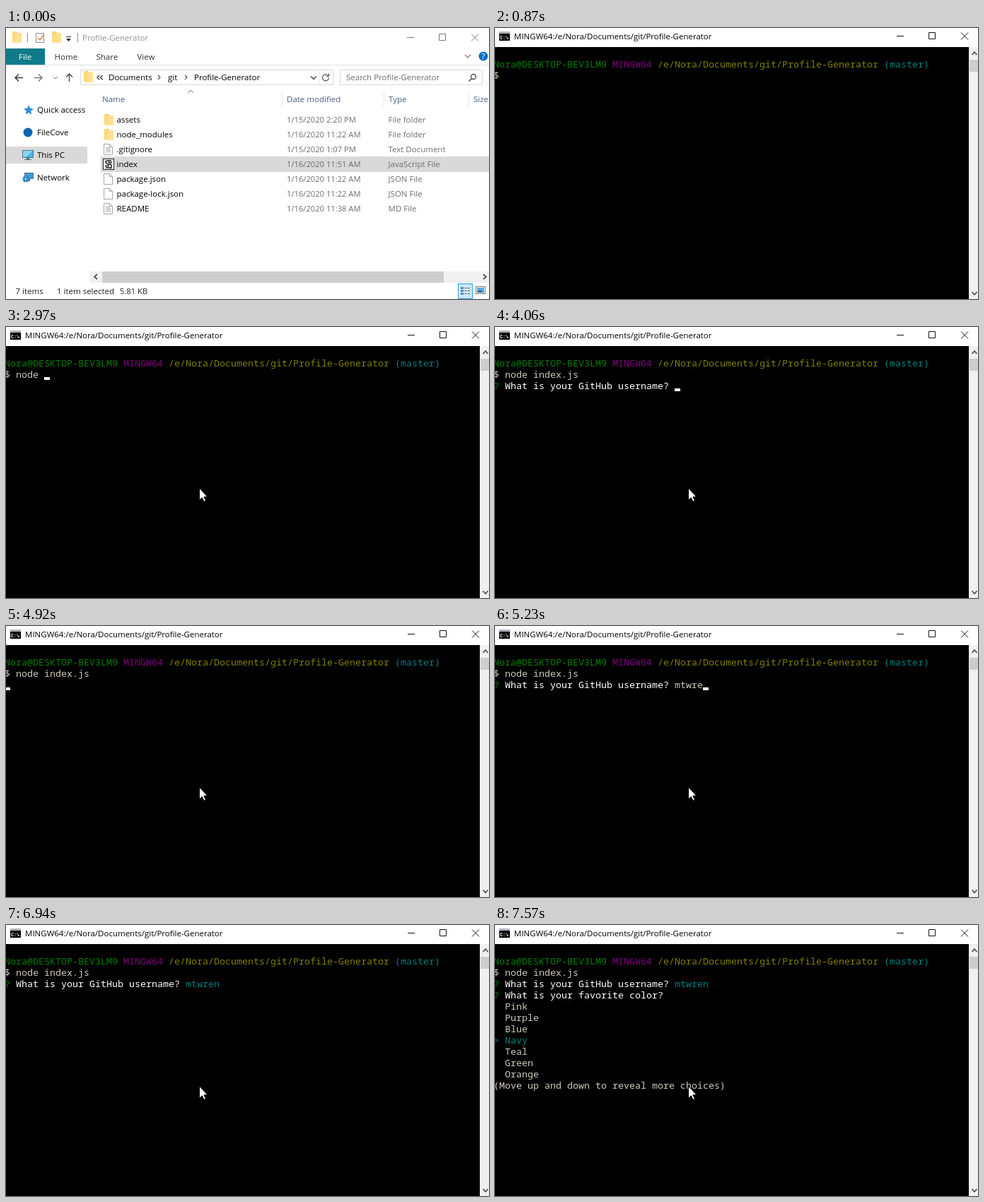
An HTML page that plays this animation: 683x384 px, repeating every 8 s.

```html
<!DOCTYPE html>
<html lang="en">
<head>
<meta charset="utf-8">
<title>Profile generator demo</title>
<style>
html, body { margin: 0; width: 100%; height: 100%; overflow: hidden; background: #fff; }
svg { display: block; width: 683px; height: 384px; }
text { white-space: pre; }
.ui { font: 11.5px "Open Sans", "Noto Sans", sans-serif; }
.date { font-size: 11.2px; }
.mono { font: 13.333px "Noto Sans Mono", monospace; }
</style>
</head>
<body>
<svg id="stage" viewBox="0 0 683 384"></svg>
<script>
const LOOP = 8000;
const USER = 'Nora', HOST = 'DESKTOP-BEV3LM9', LOGIN = 'mtwren';
const DIR = `/e/${USER}/Documents/git/Profile-Generator`;
const GREEN = '#008000', PURPLE = '#800080', OLIVE = '#808000', CYAN = '#008080',
      GRAY = '#d0cabb', WHITE = '#fff';

// drawing helpers
const rect = (x, y, w, h, fill, stroke = 'none') =>
  `<rect x="${x}" y="${y}" width="${w}" height="${h}" fill="${fill}" stroke="${stroke}"/>`;
const line = (d, color, width = 1) =>
  `<path d="${d}" fill="none" stroke="${color}" stroke-width="${width}"/>`;
const shape = (d, fill, stroke = 'none') => `<path d="${d}" fill="${fill}" stroke="${stroke}"/>`;
const circle = (x, y, r, fill) => `<circle cx="${x}" cy="${y}" r="${r}" fill="${fill}"/>`;
const move = (x, y, s) => `<g transform="translate(${x} ${y})">${s}</g>`;
const ui = (x, y, s, fill = '#000', kind = '') =>
  `<text class="ui ${kind}" x="${x}" y="${y}" fill="${fill}">${s}</text>`;

const windowButtons = color =>
  line('M568 11.5h10M613.5 6.5h9v9h-9zM659 6.5l10 10M669 6.5l-10 10', color);

// explorer icons
const folder = (x, y) => move(x, y,
  shape('M0 0h6l1 2h5v13H0z', '#f2c55c') + shape('M2 2h11v14H2z', '#ffe08f') + shape('M0 0h4v15H0z', '#ffd876'));
const page = (x, y, lines) => move(x, y,
  shape('M.5 .5h8l4 4v11H.5z', '#fff', '#a5a5a5') + line('M8.5 .5v4h4', '#a5a5a5') +
  (lines ? line('M3 5.5h6M3 7.5h7M3 9.5h7M3 11.5h7', '#aaa') : ''));
const script = (x, y) => move(x, y,
  rect(.5, .5, 15, 15, '#fff', '#222') +
  line('M12 3H7Q3 3 4.500 6T9 8T12 11T10 13H4M7 5.500h6M3 10.500h6', '#111', 1.5));
const monitor = (x, y) => move(x, y,
  rect(.5, .5, 15, 10, '#49b5e8', '#537184') + shape('M1 1h14L5 10H1z', '#8bd4f5') +
  rect(6, 11, 4, 2, '#537184') + rect(3, 13, 10, 1, '#537184'));
const network = (x, y) => move(x, y,
  rect(3.5, .5, 12, 8, '#3c9edb', '#4c7089') + rect(8, 9, 3, 3, '#4c7089') +
  circle(5, 9, 4.5, '#1d7fc4') + line('M1 9h8M5 5v8', '#9bd7f5'));

function files() {
  const rows = [
    ['assets', '1/15/2020 2:20 PM', 'File folder'],
    ['node_modules', '1/16/2020 11:22 AM', 'File folder'],
    ['.gitignore', '1/15/2020 1:07 PM', 'Text Document'],
    ['index', '1/16/2020 11:51 AM', 'JavaScript File'],
    ['package.json', '1/16/2020 11:22 AM', 'JSON File'],
    ['package-lock.json', '1/16/2020 11:22 AM', 'JSON File'],
    ['README', '1/16/2020 11:38 AM', 'MD File']];
  return rect(134, 182, 549, 22, '#d9d9d9') + rows.map(([name, date, type], i) => {
    const y = 130 + 21 * i;
    const icon = i < 2 ? folder(139, y - 8) : i === 3 ? script(137, y - 8)
      : page(138, y - 8, i === 2 || i === 6);
    return icon + ui(156.5, y + 4, name) + ui(397, y + 4, date, '#6d6d6d', 'date') +
      ui(540.5, y + 4, type, '#6d6d6d');
  }).join('');
}

function explorer() {
  const header = '#4c607a', sep = '#e5e5e5';
  return rect(0, 0, 683, 384, '#fff') +
    // title bar
    folder(9, 5) + line('M30.5 7v13M101.5 7v13', '#8a8a8a') +
    rect(42.5, 7.5, 11, 13, '#fff', '#8b8b8b') + line('M45 14l3 3 5-7', '#e0893b', 1.6) +
    folder(65, 5) + line('M85 12.5h7', '#222') + shape('M85 15h7l-3.5 4z', '#222') +
    ui(108, 18, 'Profile-Generator', '#929292') + move(-1, 2, windowButtons('#777')) +
    // ribbon
    rect(0, 29, 55, 23, '#107b88') + ui(18, 45, 'File', '#fff') +
    ui(68.5, 45, 'Home', '#333') + ui(127.5, 45, 'Share', '#333') + ui(185.5, 45, 'View', '#333') +
    line('M0 52.5h683', '#dedfe0') + line('M649 38l4 4 4-4', '#777', 1.2) +
    circle(675, 40, 6.5, '#0a6fc2') +
    '<text class="ui" x="675" y="44" fill="#fff" text-anchor="middle" font-weight="700">?</text>' +
    // address bar
    line('M24 70.5H13M18 65.5l-5 5 5 5', '#333', 1.4) +
    line('M40 70.5h11M46 65.5l5 5-5 5', '#777', 1.4) +
    line('M67 69l3 3 3-3', '#777') + line('M89.5 76V65M85 69.5l4.5-4.5 4.5 4.5', '#444', 1.4) +
    rect(105.5, 59.5, 357, 21, '#fff', '#d9d9d9') + folder(110, 61) +
    line('M132 67l-3 3 3 3M136.5 67l-3 3 3 3', '#222', 1.2) + ui(145, 74, 'Documents') +
    line('M215 67l3 3-3 3M253 67l3 3-3 3', '#444', 1.1) + ui(229, 74, 'git') + ui(266, 74, 'Profile-Generator') +
    line('M431 68.5l4 4 4-4', '#444', 1.4) + line('M443.5 60v20', sep) +
    line('M455.5 67.5a4.5 4.5 0 1 0 1 3M456.5 64.5v4h-4', '#555', 1.2) +
    rect(472.5, 59.5, 201, 21, '#fff', '#d9d9d9') + ui(481, 74, 'Search Profile-Generator', '#6d6d6d') +
    '<circle cx="661" cy="69" r="3.5" fill="none" stroke="#444" stroke-width="1.3"/>' +
    line('M658.5 71.5l-4 4', '#444', 1.6) +
    // column heads
    line('M257 92l4-4 4 4', '#777') + line('M390.5 90v22M534.5 90v22M654.5 90v22', sep) +
    ui(136, 105, 'Name', header) + ui(397, 105, 'Date modified', header) +
    ui(541, 105, 'Type', header) + ui(661, 105, 'Size', header) +
    // sidebar
    rect(0, 168, 115, 24, '#d9d9d9') +
    shape('M32 109l2 4.800 5 .4-3.800 3.400 1.100 5-4.300-2.700-4.300 2.700 1.100-5-3.800-3.400 5-.4z', '#2f8fd8') +
    circle(31, 148, 6.5, '#0a64b0') + monitor(23, 173) + network(23, 205) +
    ui(44, 120, 'Quick access') + ui(44, 152, 'FileCove') + ui(44, 184, 'This PC') + ui(44, 216, 'Network') +
    files() +
    // scroll bar and status
    rect(119, 345, 564, 16, '#f0f0f0') + rect(136, 345, 483, 16, '#cdcdcd') +
    line('M129 349l-4 3.5 4 3.5M675 349l4 3.5-4 3.5', '#505050', 1.7) +
    ui(13.5, 376.5, '7 items', '#222') + ui(72, 376.5, '1 item selected', '#222') +
    ui(161, 376.5, '5.81 KB', '#222', 'date') +
    rect(639.5, 362.5, 20, 21, '#cce8ff', '#26a0da') +
    line('M643 368.5h4M643 372.5h4M643 376.5h4', '#2c5f87', 2) +
    line('M648.5 368.5h3M653 368.5h3M648.5 372.5h3M653 372.5h3M648.5 376.5h3M653 376.5h3', '#555') +
    rect(664.5, 366.5, 13, 10, '#fff', '#777') + rect(666, 368, 10, 7, '#5aa9dc') + shape('M666 375l4-4 6 4z', '#2e6e9e');
}

function terminalFrame() {
  return rect(0, 0, 683, 27, '#fff') + rect(0, 27, 670, 357, '#000') +
    rect(6, 5, 15, 13, '#000') + rect(6, 5, 15, 3, '#a9b2bb') +
    '<text x="7" y="15.5" fill="#fff" font-family="Liberation Mono, monospace" font-size="6.5" font-weight="700">C:\\</text>' +
    rect(17, 14, 2, 1, '#fff') + windowButtons('#111') +
    rect(670, 27, 13, 357, '#f0f0f0') + rect(671, 45, 12, 17, '#cdcdcd') +
    line('M674.5 38l3.5-4 3.5 4M674.5 374l3.5 4 3.5-4', '#505050', 1.7);
}

// console grid: 8 x 16 cells
const colX = c => 8 * c - 2;
const rowY = r => 43 + 16 * r;
const put = (c, r, s, fill = GRAY) =>
  `<text class="mono" x="${colX(c)}" y="${rowY(r) + 13}" fill="${fill}">${s}</text>`;
const caret = (c, r) => rect(colX(c), rowY(r) + 12, 8, 4, WHITE);

// value of the last step already reached
const at = (t, steps) => steps.reduce((v, [time, value]) => t >= time ? value : v, undefined);

const COMMAND = [[0, 0], [2500, 1], [2650, 2], [2730, 3], [2900, 4], [2970, 5], [3140, 7], [3290, 14]];
const ANSWER = [[0, 0], [4620, 1], [4770, 2], [5000, 3], [5080, 4], [5230, 5], [5380, 6]];
const CHOICE = [[5770, 0], [7020, 1], [7170, 2], [7340, 3], [7570, 4]];
const COLORS = ['Red', 'Pink', 'Purple', 'Blue', 'Navy', 'Teal', 'Green', 'Orange'];
const POINTER = [[1250, [370, 355]], [1340, [326, 297]], [1430, [290, 249]], [1520, [274, 229]]];

const within = (t, a, b) => t >= a && t < b;

function menu(t) {
  if (t < 5770 || within(t, 6940, 7020) || within(t, 7550, 7570)) return '';
  const pick = at(t, CHOICE), top = Math.max(0, pick - 3);
  let out = put(0, 3, '?', GREEN) + put(2, 3, 'What is your favorite color?', WHITE);
  if (pick === 0) out += put(31, 3, '(Use arrow keys)');
  COLORS.slice(top, top + 7).forEach((name, i) => {
    const on = top + i === pick;
    if (on) out += put(0, 4 + i, '&gt;', CYAN);
    out += put(2, 4 + i, name, on ? CYAN : GRAY);
  });
  return out + put(0, 11, '(Move up and down to reveal more choices)');
}

function terminal(t) {
  const who = `${USER}@${HOST}`, path = who.length + 9;
  const typed = at(t, COMMAND), answer = at(t, ANSWER);
  const asking = t >= 4060 && !within(t, 4920, 5000);
  let out = ui(27, 16, (within(t, 1720, 2420) ? 'Select ' : '') + 'MINGW64:' + DIR) +
    put(0, 0, who, GREEN) + put(who.length + 1, 0, 'MINGW64', PURPLE) +
    put(path, 0, DIR, OLIVE) + put(path + DIR.length + 1, 0, '(master)', CYAN) +
    put(0, 1, '$ ' + 'node index.js '.slice(0, typed));
  if (asking) {
    out += put(0, 2, '?', GREEN) + put(2, 2, 'What is your GitHub username?', WHITE) +
      put(32, 2, LOGIN.slice(0, answer), t < 5770 ? GRAY : CYAN);
  }
  out += menu(t);
  if (within(t, 1250, 1960) || within(t, 2420, 3520)) out += caret(2 + typed, 1);
  if (within(t, 3600, 5630)) out += asking ? caret(32 + answer, 2) : caret(0, 2);
  if (within(t, 1660, 2420)) out += rect(colX(34), rowY(11), 8, 16, WHITE);
  const p = at(t, POINTER);
  if (p) out += move(p[0], p[1],
    shape('M-.5 -.5v17l3.8-3.6 2.7 5.6 2.6-1.2-2.7-5.5h5.2z', WHITE, '#000'));
  return out;
}

const stage = document.getElementById('stage');
stage.innerHTML = `<g>${explorer()}</g><g>${terminalFrame()}<g></g></g>`;
const [desk, shell] = stage.children, live = shell.lastElementChild;
let shown = '';

function draw(t) {
  const open = t >= 870;
  desk.style.display = open ? 'none' : '';
  shell.style.display = open ? '' : 'none';
  const next = open ? terminal(t) : '';
  if (next !== shown) live.innerHTML = shown = next;
}

let start;
function tick(now) {
  start ??= now;
  draw((now - start) % LOOP);
  requestAnimationFrame(tick);
}
draw(0);
requestAnimationFrame(tick);
</script>
</body>
</html>
```
